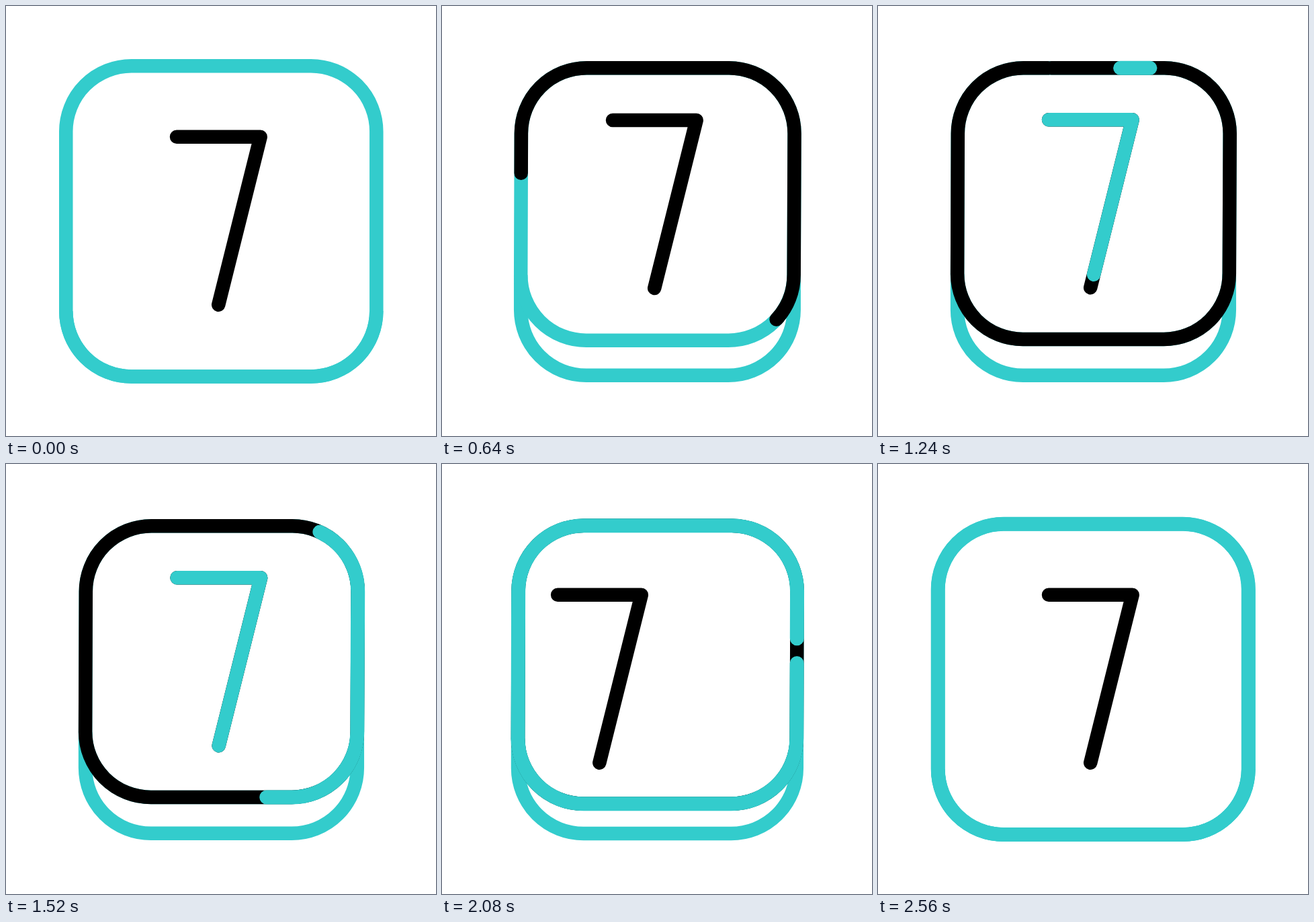
An HTML page for the animation above (2.8 s loop, 640 by 640 pixels).

```html
<!DOCTYPE html>
<html lang="en">
<head>
<meta charset="utf-8">
<title>Key press</title>
<style>
  html, body { margin: 0; width: 100%; height: 100%; overflow: hidden; background: #fff; }
  svg { display: block; width: 100%; height: 100%; }
  path { fill: none; stroke-width: 20.5; stroke-linecap: round; stroke-linejoin: round; }
  .teal { stroke: #33cccc; }
  .black { stroke: #000; }
  #base { stroke-linecap: butt; }
  #wipe { stroke-width: 21; }
</style>
</head>
<body>
<svg viewBox="0 0 640 640">
  <clipPath id="inside"><path id="hole"/></clipPath>
  <path id="base" class="teal"/>
  <g clip-path="url(#inside)">
    <g id="digit">
      <path class="black" d="M254 194.7H378.7L316.2 444.7"/>
      <path id="ink" class="teal" pathLength="1" d="M254 194.7H378.7L316.2 444.7"/>
    </g>
  </g>
  <path id="face" class="teal"/>
  <path id="line" class="black" pathLength="1"/>
  <path id="wipe" class="teal" pathLength="1"/>
</svg>
<script>
const LOOP = 2800, STEP = 40, R = 97.5, LIFT = 25.4, SLIDE = 300;
const $ = id => document.getElementById(id);
const [base, hole, digit, ink, face, line, wipe] =
  ['base', 'hole', 'digit', 'ink', 'face', 'line', 'wipe'].map($);

const mix = (a, b, p) => a + (b - a) * p;
const span = (t, from, to) => Math.min(1, Math.max(0, (t - from) / (to - from)));

// Cubic bezier easing with flat ends: (x1, 0, x2, 1)
function ease(u, x1, x2) {
  let lo = 0, hi = 1;
  for (let i = 0; i < 24; i++) {
    const s = (lo + hi) / 2, q = 1 - s;
    if (3 * x1 * s * q * q + 3 * x2 * s * s * q + s * s * s < u) lo = s; else hi = s;
  }
  return u <= 0 ? 0 : u >= 1 ? 1 : lo * lo * (3 - 2 * lo);
}
const move = (t, from, to) => ease(span(t, from, to), .7, .3);
const grow = (t, from) => ease(span(t, from, from + 1264), .55, .23);

// Show the part of a path that begins at `start` and covers `len`
function trim(path, len, start = 0) {
  path.style.display = len > 0 ? '' : 'none';
  path.style.strokeDasharray = len < 1 ? `${len} ${1 - len}` : 'none';
  path.style.strokeDashoffset = -start;
}

function shape(p) {
  const lt = mix(89.25, 118.8, p), lb = mix(89.25, 118.1, p);
  const rt = mix(551.3, 523.7, p), rb = mix(551.3, 522.8, p);
  const top = mix(89.3, 92.3, p), low = mix(551.5, 496, p), floor = mix(551.5, 549.8, p);
  const arc = (x, y, turn = 1) => `A${R} ${R} 0 0 ${turn} ${x} ${y}`;
  const card = `M${lb} ${low - R}L${lt} ${top + R}${arc(lt + R, top)}H${rt - R}` +
    `${arc(rt, top + R)}L${rb} ${low - R}${arc(rb - R, low)}H${lb + R}${arc(lb, low - R)}Z`;
  for (const el of [face, hole, line, wipe]) el.setAttribute('d', card);
  base.setAttribute('d', `M${lb} ${low - R}V${floor - R}${arc(lb + R, floor, 0)}` +
    `H${rb - R}${arc(rb, floor - R, 0)}V${low - R}`);
}

function draw(t) {
  const press = move(t, 120, 760) - move(t, 1845, 2485);
  shape(press);
  trim(line, t < 2360 ? grow(t, 71) : 0, .011 + .093 * (t - 320) / 320);
  trim(wipe, grow(t, 1055), .4235 + .1485 * (t - 1520) / 560);

  const leaving = t < 1820;
  const x = leaving ? SLIDE * span(t, 1480, 1820) ** 3
                    : -SLIDE * (1 - span(t, 1820, 2560)) ** 3;
  const y = leaving ? -LIFT * press : 0;
  digit.setAttribute('transform', `translate(${x} ${y})`);
  trim(ink, leaving ? move(t, 750, 1390) : 0);
}

function tick(now) {
  draw(Math.floor(now % LOOP / STEP) * STEP);
  requestAnimationFrame(tick);
}
draw(0);
requestAnimationFrame(tick);
</script>
</body>
</html>
```
